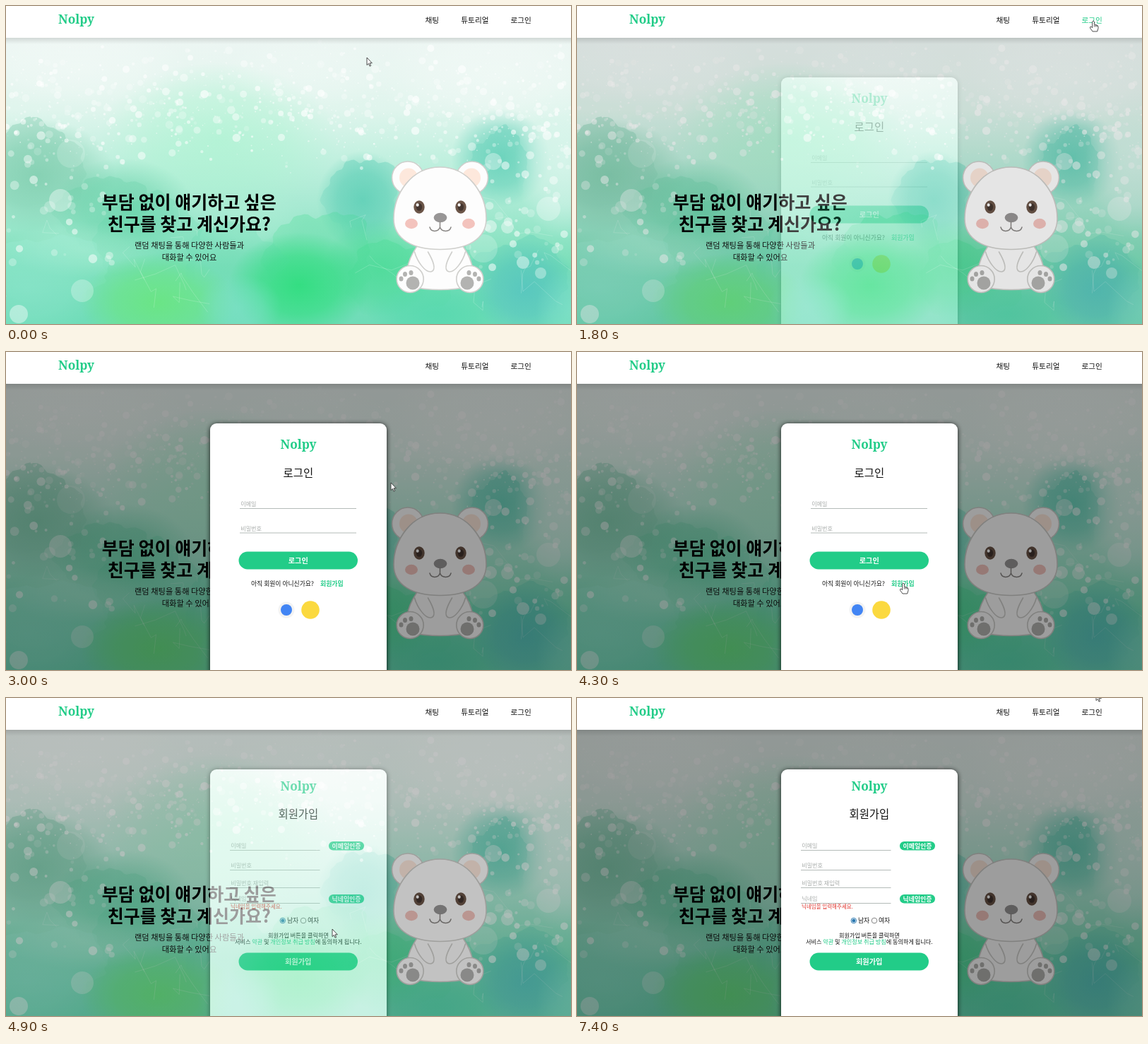
Animation, 800 px wide and 450 px high, one loop 7.6 s. Source, as an HTML page with a canvas:

```html
<!DOCTYPE html>
<html lang="ko">
<head>
<meta charset="utf-8">
<title>Nolpy</title>
<style>
  html, body { margin: 0; width: 100%; height: 100%; overflow: hidden; background: #fff; }
  canvas { display: block; width: 100vw; height: 100vh; }
</style>
</head>
<body>
<canvas id="stage" width="800" height="450"></canvas>
<script>
const W = 800, H = 450, LOOP = 7600, STEP = 100;
const GREEN = '#22cc88', INK = '#111', HINT = '#a9adab';
const SANS = "'Noto Sans CJK KR', 'Noto Sans KR', 'Noto Sans CJK', sans-serif";
const SERIF = "'Noto Serif', serif";
const NAME = 'Nolpy';
const stage = document.getElementById('stage').getContext('2d');

function layer(draw) {
  const c = document.createElement('canvas');
  c.width = W;
  c.height = H;
  draw(c.getContext('2d'));
  return c;
}

function random(seed) {
  return () => (seed = (seed * 16807) % 2147483647) / 2147483647;
}

function text(c, str, x, y, size, { color = INK, weight = 400, align = 'left', font = SANS } = {}) {
  c.font = `${weight} ${size}px ${font}`;
  c.fillStyle = color;
  c.textAlign = align;
  c.fillText(str, x, y);
  return c.measureText(str).width;
}

function ellipse(c, x, y, rx, ry, fill, stroke) {
  c.beginPath();
  c.ellipse(x, y, rx, ry, 0, 0, Math.PI * 2);
  if (fill) { c.fillStyle = fill; c.fill(); }
  if (stroke) { c.strokeStyle = stroke; c.stroke(); }
}

function pill(c, x, y, w, h, fill, r = h / 2) {
  c.beginPath();
  c.roundRect(x, y, w, h, r);
  c.fillStyle = fill;
  c.fill();
}

// ---- watercolour background ----

function wash(c, x, y, rx, ry, rgb, alpha) {
  c.save();
  c.translate(x, y);
  c.scale(rx, ry);
  const g = c.createRadialGradient(0, 0, 0, 0, 0, 1);
  g.addColorStop(0, `rgba(${rgb},${alpha})`);
  g.addColorStop(0.55, `rgba(${rgb},${alpha * 0.65})`);
  g.addColorStop(1, `rgba(${rgb},0)`);
  c.fillStyle = g;
  c.fillRect(-1, -1, 2, 2);
  c.restore();
}

// Irregular stain: crisp upper rim that fades out downwards.
function stain(c, x, y, rx, ry, rgb, alpha, rnd) {
  const a = rnd() * 6, b = rnd() * 6;
  c.beginPath();
  for (let i = 0; i <= 90; i++) {
    const u = i / 90 * Math.PI * 2;
    const r = 1 + 0.08 * Math.sin(3 * u + a) + 0.06 * Math.sin(5 * u + b)
      + 0.04 * Math.sin(11 * u + a) + 0.02 * Math.sin(23 * u + b);
    c.lineTo(x + rx * r * Math.cos(u), y + ry * r * Math.sin(u));
  }
  const g = c.createLinearGradient(0, y - ry, 0, y + ry);
  g.addColorStop(0, `rgba(${rgb},${alpha})`);
  g.addColorStop(1, `rgba(${rgb},0)`);
  c.fillStyle = g;
  c.fill();
}

function drawScenery(c) {
  const rnd = random(4711);
  const sky = c.createLinearGradient(0, 45, 0, H);
  [[0, '#edf6f3'], [0.25, '#e0f5ed'], [0.4, '#c5f1e1'], [0.6, '#a5e9d1'], [0.8, '#78deb8'], [1, '#6fdcb8']]
    .forEach(s => sky.addColorStop(...s));
  c.fillStyle = sky;
  c.fillRect(0, 0, W, H);

  const teal = '75,200,175', pale = '222,246,238', green = '60,218,140', white = '246,251,249';
  [
    [300, 190, 170, 110, '170,243,208', 0.7],
    [45, 240, 110, 80, '110,195,160', 0.6],
    [165, 285, 100, 70, '90,205,160', 0.55],
    [505, 275, 65, 70, teal, 0.65],
    [700, 215, 70, 70, teal, 0.65],
    [790, 220, 70, 110, pale, 0.7],
    [345, 300, 80, 50, '175,238,214', 0.6],
    [110, 345, 110, 40, '175,238,214', 0.5],
    [30, 400, 110, 70, '140,228,205', 0.6],
    [215, 420, 110, 70, '105,230,125', 0.85],
    [415, 395, 100, 75, '40,222,120', 0.85],
    [330, 425, 60, 45, '125,225,200', 0.6],
    [530, 370, 80, 70, green, 0.55],
    [610, 435, 100, 50, '75,215,170', 0.6],
    [735, 400, 75, 70, '80,190,195', 0.7],
    [800, 430, 50, 60, '130,225,205', 0.6],
    [100, 85, 160, 60, white, 0.5],
    [690, 100, 170, 70, white, 0.55],
    [430, 95, 130, 50, white, 0.3]
  ].forEach(w => wash(c, ...w));

  [
    [42, 228, 70, 62, '100,190,155', 0.32],
    [140, 295, 65, 55, '85,200,155', 0.24],
    [205, 335, 75, 65, '80,210,160', 0.22],
    [55, 375, 90, 50, '160,238,216', 0.3],
    [320, 360, 70, 50, '85,215,170', 0.22],
    [445, 360, 75, 70, green, 0.28],
    [505, 275, 52, 60, teal, 0.34],
    [700, 225, 40, 50, teal, 0.3],
    [728, 385, 70, 55, teal, 0.28],
    [555, 390, 75, 55, green, 0.28]
  ].forEach(s => stain(c, ...s, rnd));

  // Fine pale veins in the paint.
  c.strokeStyle = 'rgba(255,255,255,.18)';
  c.lineWidth = 1;
  for (let i = 0; i < 20; i++) {
    let x = (i % 2 ? 480 : 0) + rnd() * 300, y = 270 + rnd() * 150;
    c.beginPath();
    c.moveTo(x, y);
    for (let k = 0; k < 4; k++) c.lineTo(x += rnd() * 44 - 12, y += rnd() * 44 - 14);
    c.stroke();
  }

  const dot = (x, y, r, a) => ellipse(c, x, y, r, r, `rgba(255,255,255,${a})`);
  for (let i = 0; i < 900; i++) {
    const y = 46 + (rnd() + rnd()) / 2 * 195;
    dot(rnd() * W, y, 0.8 + 5 * rnd() ** 3, 0.15 + rnd() * 0.5);
  }
  for (let i = 0; i < 110; i++) {
    const x = rnd() < 0.4 ? rnd() * 150 : 645 + rnd() * 155;
    dot(x, 140 + rnd() * 230, 1.5 + rnd() * 5, 0.15 + rnd() * 0.4);
  }
  [
    [92, 209, 20, 0.16], [77, 275, 16, 0.38], [62, 284, 8, 0.25], [18, 436, 13, 0.42],
    [108, 403, 16, 0.28], [768, 287, 17, 0.3], [686, 312, 9, 0.45], [710, 313, 9, 0.4],
    [732, 363, 9, 0.45], [757, 378, 8, 0.35], [676, 343, 20, 0.2], [690, 220, 12, 0.35]
  ].forEach(d => dot(...d));
}

// ---- bear ----

function drawBear(c) {
  const fur = '#fdfdfd', line = '#cfcfcc', pad = '#b3b3b1';
  const mid = 614.5;
  const both = fn => [-1, 1].forEach(fn);
  c.lineWidth = 1.6;
  c.lineCap = 'round';

  both(s => {
    ellipse(c, mid + s * 45.5, 243, 22.5, 23, fur, line);
    ellipse(c, mid + s * 44.5, 243, 13, 13.5, '#fde8dc');
  });

  c.beginPath();
  c.moveTo(586, 335);
  c.bezierCurveTo(572, 352, 562, 376, 571, 397);
  c.quadraticCurveTo(mid, 406, 658, 397);
  c.bezierCurveTo(667, 376, 657, 352, 643, 335);
  c.fillStyle = fur;
  c.fill();
  c.strokeStyle = line;
  c.stroke();

  both(s => {
    c.beginPath();
    c.moveTo(mid + s * 36, 348);
    c.bezierCurveTo(mid + s * 32, 362, mid + s * 21, 377, mid + s * 13, 376);
    c.bezierCurveTo(mid + s * 4, 374, mid + s * 10, 360, mid + s * 17, 348);
    c.stroke();
    ellipse(c, mid + s * 42.3, 386.5, 19, 19, fur, line);
    ellipse(c, mid + s * 38.5, 392, 9.5, 9.5, pad);
    [[55, 386], [49.5, 379.5], [41, 377.5]].forEach(([dx, y]) => ellipse(c, mid + s * dx, y, 3, 3.5, pad));
  });

  c.beginPath();
  c.moveTo(mid, 228);
  c.bezierCurveTo(655, 228, 680, 266, 680, 301);
  c.bezierCurveTo(680, 330, 653, 344.5, mid, 344.5);
  c.bezierCurveTo(576, 344.5, 549, 330, 549, 301);
  c.bezierCurveTo(549, 266, 574, 228, mid, 228);
  c.fillStyle = fur;
  c.fill();
  c.stroke();

  both(s => {
    const x = mid + s * 29.5;
    ellipse(c, x, 284.5, 7.7, 9.2, '#6b5548');
    ellipse(c, x, 284.5, 4.2, 5.2, '#43352f');
    ellipse(c, x - 2.3, 281.5, 2, 2.3, '#fff');
    ellipse(c, mid + s * 40.5, 308, 9, 7.2, '#f3c3bd');
  });

  ellipse(c, mid + 0.5, 299.5, 9.3, 6.7, '#989696');
  c.strokeStyle = '#8a8785';
  c.lineWidth = 1.5;
  c.beginPath();
  c.moveTo(mid, 306);
  c.lineTo(mid, 313);
  c.moveTo(600, 313);
  c.bezierCurveTo(602, 320.5, 612, 320, mid, 313);
  c.bezierCurveTo(617, 320, 628, 320.5, 630, 313);
  c.stroke();
}

function drawPage(c) {
  drawScenery(c);
  drawBear(c);
  const mid = { align: 'center' }, head = { align: 'center', weight: 700, color: '#000' };
  text(c, '부담 없이 얘기하고 싶은', 259.3, 286.5, 25, head);
  text(c, '친구를 찾고 계신가요?', 259.3, 317.5, 25, head);
  text(c, '랜덤 채팅을 통해 다양한 사람들과', 259.5, 343, 11.25, mid);
  text(c, '대화할 수 있어요', 259.5, 360, 11.25, mid);
}

function drawHeader(c, glow) {
  const g = c.createLinearGradient(0, 45, 0, 54);
  g.addColorStop(0, 'rgba(0,0,0,.12)');
  g.addColorStop(1, 'rgba(0,0,0,0)');
  c.fillStyle = g;
  c.fillRect(0, 45, W, 9);
  c.fillStyle = '#fff';
  c.fillRect(0, 0, W, 45);
  brand(c, 99.5, 24.5);
  text(c, '채팅', 593.5, 24.3, 10.67);
  text(c, '튜토리얼', 644.3, 24.3, 10.67);
  const mix = (a, b) => Math.round(a + (b - a) * glow);
  text(c, '로그인', 714.5, 24.3, 10.67, { color: `rgb(${mix(17, 34)},${mix(17, 204)},${mix(17, 136)})` });
}

// ---- dialogs ----

function brand(c, x, y) {
  text(c, NAME, x, y, 17.2, { color: GREEN, weight: 700, align: 'center', font: SERIF });
}

function field(c, label, x, y, w) {
  text(c, label, x + 1.2, y - 2.8, 8.1, { color: HINT });
  c.fillStyle = '#b4bbb8';
  c.fillRect(x, y, w, 1);
}

function button(c, label, y, fill = GREEN) {
  pill(c, 329.5, y, 168.5, 25, fill);
  text(c, label, 413.7, y + 16.2, 10.2, { color: '#fff', weight: 700, align: 'center' });
}

// The dimming surrounds the card but never lies under it.
function dialog(c, title, logoY, titleY) {
  c.fillStyle = 'rgba(0,0,0,.38)';
  c.fillRect(0, 0, W, H);
  c.save();
  c.shadowColor = 'rgba(0,0,0,.85)';
  c.shadowBlur = 7;
  c.shadowOffsetY = 1;
  pill(c, 289, 101, 250, 380, '#fff', 9);
  c.restore();
  brand(c, 414, logoY);
  text(c, title, 413.8, titleY, 15.4, { align: 'center' });
}

function drawLogin(c, hover) {
  dialog(c, '로그인', 137, 176.7);
  field(c, '이메일', 331, 221, 165);
  field(c, '비밀번호', 331, 255.5, 165);
  button(c, '로그인', 282.5, hover ? '#1cb377' : GREEN);
  text(c, '아직 회원이 아니신가요?', 347, 330.6, 8.8);
  text(c, '회원가입', 445, 330.6, 8.9, { color: GREEN, weight: 700 });
  ellipse(c, 397, 365, 11.5, 11.5, '#f3f3f3');
  ellipse(c, 397, 365, 8, 8, '#4285f4');
  ellipse(c, 431, 365, 12.8, 12.8, '#fbd93f');
}

function radio(c, x, on) {
  const color = on ? '#2a78b0' : '#777';
  c.lineWidth = 0.9;
  ellipse(c, x, 315, 3.8, 3.8, '#fff', color);
  if (on) ellipse(c, x, 315, 2.5, 2.5, color);
}

function drawSignup(c) {
  dialog(c, '회원가입', 130.5, 169.7);
  [['이메일', 215], ['비밀번호', 243], ['비밀번호 재입력', 268], ['닉네임', 290]]
    .forEach(([label, y]) => field(c, label, 317, y, 127.5));
  [['이메일인증', 203], ['닉네임인증', 278]].forEach(([label, y]) => {
    pill(c, 457, y, 50, 12.5, GREEN);
    text(c, label, 482, y + 9.5, 8.9, { color: '#fff', weight: 700, align: 'center' });
  });
  text(c, '닉네임을 입력해주세요.', 318, 297.5, 7.5, { color: '#e0332c', weight: 500 });
  radio(c, 391.8, true);
  text(c, '남자', 398, 318.3, 8.8);
  radio(c, 421, false);
  text(c, '여자', 427, 318.3, 8.8);
  text(c, '회원가입 버튼을 클릭하면', 414, 339.3, 8.13, { align: 'center' });
  let x = 324;
  [['서비스 '], ['약관', GREEN], [' 및 '], ['개인정보 취급 방침', GREEN], ['에 동의하게 됩니다.']]
    .forEach(([part, color = INK]) => { x += text(c, part, x, 347.6, 8.13, { color }); });
  button(c, '회원가입', 360.5);
}

// ---- pointer ----

const ARROW = new Path2D('M0 0V10.6L2.4 8.4L4 12.2L5.6 11.5L4 7.8H7.3Z');
const HAND = new Path2D('M-1.4 1.2Q0-1.2 1.4 1.2V5.2L5 6Q7 6.6 7 8.5V10.5L5.7 15H-1L-4.4 10.2Q-5 8-3 8.2L-1.4 9.8Z');
const ROUTE = [
  [0, 511, 73], [300, 511, 73], [400, 482, 108], [500, 432, 152], [600, 407, 173], [700, 448, 152],
  [800, 560, 102], [900, 680, 52], [1000, 725, 30], [1100, 731, 21], [1800, 731, 21],
  [1900, 727, 22], [2000, 725, 22], [2500, 725, 22], [2600, 712, 30], [2800, 640, 90],
  [3000, 545, 185], [3200, 470, 265], [3300, 447, 284], [3400, 445, 298], [3500, 452, 315],
  [3600, 461, 326], [4200, 461, 326], [4300, 462, 327], [6300, 462, 327], [6400, 510, 282],
  [6500, 610, 264], [6600, 700, 345], [6700, 742, 452], [6900, 742, 452], [7000, 755, 415],
  [7100, 788, 290], [7200, 772, 150], [7300, 750, 50], [7400, 735, -7], [7600, 735, -7]
];

function pointerAt(t) {
  const i = ROUTE.findIndex(k => k[0] > t);
  const [t0, x0, y0] = ROUTE[i - 1], [t1, x1, y1] = ROUTE[i];
  const p = (t - t0) / (t1 - t0);
  return [x0 + (x1 - x0) * p, y0 + (y1 - y0) * p];
}

function drawPointer(c, t) {
  const hand = (t >= 1100 && t < 2600) || (t >= 3800 && t < 4800);
  const shape = hand ? HAND : ARROW;
  c.save();
  c.translate(...pointerAt(t));
  c.lineWidth = 0.8;
  c.lineJoin = 'round';
  c.fillStyle = '#fff';
  c.strokeStyle = '#222';
  c.fill(shape);
  c.stroke(shape);
  if (hand) {
    c.beginPath();
    [1.4, 3.4, 5.2].forEach(x => { c.moveTo(x, 6); c.lineTo(x, 8.5); });
    c.lineWidth = 0.7;
    c.stroke();
  }
  c.restore();
}

// ---- timeline ----

const page = layer(drawPage);
const login = layer(c => drawLogin(c, false));
const loginHover = layer(c => drawLogin(c, true));
const signup = layer(drawSignup);

const LOGIN_AT = 1800, SIGNUP_AT = 4800;
const FADE = [0.25, 0.61, 0.89, 1];
const ramp = (t, from, span) => Math.min(1, Math.max(0, (t - from) / span));

function render(t) {
  const c = stage;
  c.drawImage(page, 0, 0);
  if (t >= LOGIN_AT) {
    const second = t >= SIGNUP_AT;
    const step = Math.round((t - (second ? SIGNUP_AT : LOGIN_AT)) / STEP);
    const hover = t >= 3400 && t < 3600;
    c.globalAlpha = FADE[Math.min(step, FADE.length - 1)];
    c.drawImage(second ? signup : hover ? loginHover : login, 0, 0);
    c.globalAlpha = 1;
  }
  drawHeader(c, ramp(t, 1100, 200) - ramp(t, 2500, 200));
  drawPointer(c, t);
}

// The picture advances in tenths of a second.
function tick() {
  const t = performance.now() % LOOP;
  render(Math.floor(t / STEP) * STEP);
  requestAnimationFrame(tick);
}
tick();
</script>
</body>
</html>
```
